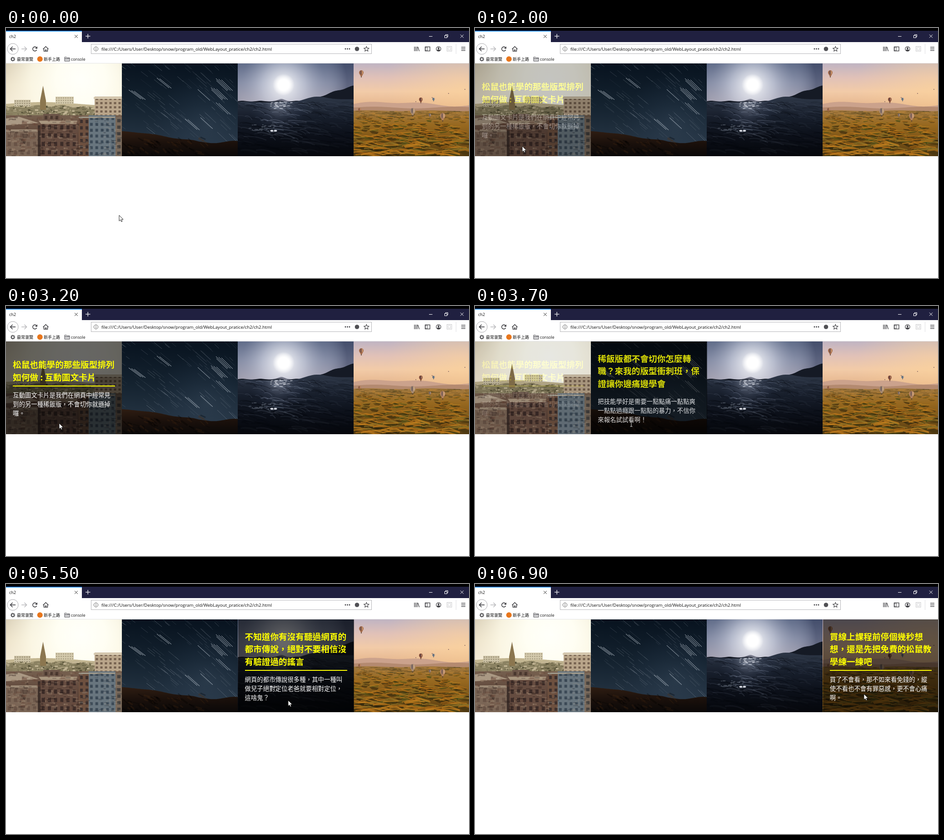
An HTML page with a canvas for the animation above (7300 ms loop, 1019 by 550 pixels).

```html
<!DOCTYPE html>
<html lang="zh-Hant">
<head>
<meta charset="utf-8">
<style>
html, body { margin: 0; width: 100%; height: 100%; overflow: hidden; background: #fff; }
canvas, svg { position: absolute; left: 0; top: 0; }
.card {
  position: absolute; top: 78px; width: 255.25px; height: 204px; box-sizing: border-box; padding: 0 15px;
  display: flex; flex-direction: column; justify-content: center; overflow: hidden;
  background: rgba(0, 0, 0, .6); color: #fff; white-space: nowrap;
  font: 13.43px/20.15px "Noto Sans CJK TC", "Noto Sans CJK", sans-serif;
}
h2 { position: relative; margin: 0 0 8px; padding-bottom: 7px; font-size: 18.65px; line-height: 27.8px; color: #ff0; }
h2 i { position: absolute; left: 0; bottom: 0; height: 2px; background: #ff0; }
p { margin: 0; }
</style>
</head>
<body>
<canvas id="stage" width="1019" height="550"></canvas>
<div id="cards"></div>
<svg width="1019" height="550">
  <g id="cursor">
    <path id="arrow" d="M0 0V12.6L2.9 9.9L4.8 14.2L6.9 13.3L5 9.1H9Z" fill="#fff" stroke="#111" stroke-width=".9"/>
    <path id="beam" d="M-2.5-6H2.5M0-6V6M-2.5 6H2.5" fill="none" stroke="#ddd"/>
  </g>
</svg>
<script>
const $ = id => document.getElementById(id);
const c = $('stage').getContext('2d');
const TOP = 78, BOTTOM = 282;
const left = i => Math.floor(i * 255.25);

// Drawing helpers
let seed = 7;
const rnd = (a = 0, b = 1) => a + (b - a) * ((seed = seed * 16807 % 2147483647) / 2147483647);
const pick = list => list[Math.floor(rnd(0, list.length))];
const rect = (color, x, y, w, h) => { c.fillStyle = color; c.fillRect(x, y, w, h); };
function trace(pts) {
  c.beginPath();
  for (let i = 0; i < pts.length; i += 2) c.lineTo(pts[i], pts[i + 1]);
}
const poly = (color, ...pts) => { trace(pts); c.fillStyle = color; c.fill(); };
const line = (color, width, ...pts) => { trace(pts); c.strokeStyle = color; c.lineWidth = width; c.stroke(); };
function disc(color, x, y, rx, ry = rx) {
  c.beginPath(); c.ellipse(x, y, rx, ry, 0, 0, 7); c.fillStyle = color; c.fill();
}
function ring(color, width, x, y, r, from = 0, to = 2 * Math.PI) {
  c.beginPath(); c.arc(x, y, r, from, to); c.strokeStyle = color; c.lineWidth = width; c.stroke();
}
const frame = (color, width, x, y, w, h) => { c.strokeStyle = color; c.lineWidth = width; c.strokeRect(x, y, w, h); };
function text(s, x, y, size) {
  c.font = `${size}px "Open Sans", "Noto Sans CJK TC", "Noto Sans CJK", sans-serif`;
  c.fillStyle = '#111'; c.fillText(s, x, y);
}
function fade(gradient, colors) {
  colors.forEach((color, i) => gradient.addColorStop(i / (colors.length - 1), color));
  return gradient;
}
const vertical = (y0, y1, ...colors) => fade(c.createLinearGradient(0, y0, 0, y1), colors);
const glow = (x, y, r, ...colors) => fade(c.createRadialGradient(x, y, 0, x, y, r), colors);
const fill = (i, color, y = TOP) => rect(color, left(i), y, 256, BOTTOM - y);
// Ground of photo i below the height f(u), u = 0..1 across the photo
function ridge(i, color, f) {
  c.beginPath(); c.moveTo(left(i), BOTTOM);
  for (let x = 0; x <= 256; x += 2) c.lineTo(left(i) + x, f(x / 256));
  c.lineTo(left(i) + 256, BOTTOM); c.fillStyle = color; c.fill();
}
// Block with evenly spaced windows
function building(wall, glass, x, y, w, h, cols, rows) {
  rect(wall, x, y, w, h);
  const dx = w / cols, dy = h / rows;
  for (let i = 0; i < cols; i++)
    for (let j = 0; j < rows; j++) rect(glass, x + (i + .25) * dx, y + (j + .3) * dy, dx * .5, dy * .5);
}
function speckle(n, x, y, w, h, colors, mw, mh) {
  for (let i = 0; i < n; i++) rect(pick(colors), rnd(x, x + w), rnd(y, y + h), rnd(1, mw), rnd(1, mh));
}

function drawBrowser() {
  const ink = '#3c3c40';
  rect('#000', 0, 0, 1019, 6);
  rect('#202040', 0, 6, 1019, 25);
  rect('#fff', 0, 6, 167, 25);
  rect('#0a84ff', 0, 6, 167, 1.6);
  text('ch2', 7, 22, 9);
  const cross = (color, x, y, r) => {
    line(color, 1, x - r, y - r, x + r, y + r);
    line(color, 1, x - r, y + r, x + r, y - r);
  };
  cross('#222', 154.5, 18.5, 3.3);
  line('#fff', 1.2, 175, 18, 185.5, 18);
  line('#fff', 1.2, 180.2, 13, 180.2, 23);
  line('#fff', 1, 931, 18.5, 938.5, 18.5);
  frame('#fff', 1, 965.5, 16.5, 5, 5);
  line('#fff', 1, 967.5, 16, 967.5, 14.5, 972.5, 14.5, 972.5, 19.5, 971, 19.5);
  cross('#fff', 1003.5, 18, 3.5);

  rect('#fff', 0, 31, 1019, 47);
  rect('#e4e4e6', 0, 77, 1019, 1);
  ring('#a9a9ad', 1, 15, 46, 12);
  line(ink, 1.6, 21, 46, 10, 46); line(ink, 1.6, 14.5, 41, 9.5, 46, 14.5, 51);
  line('#b8b8bb', 1.5, 34, 46, 45, 46); line('#b8b8bb', 1.5, 40.5, 41, 45.5, 46, 40.5, 51);
  ring(ink, 1.6, 63.5, 46, 4.6, .5, 5.5);
  poly(ink, 69, 40.5, 69, 45.5, 64, 45.5);
  line(ink, 1.5, 81.5, 46.5, 87.5, 40.8, 93.5, 46.5);
  line(ink, 1.5, 83.5, 45.5, 83.5, 51, 91.5, 51, 91.5, 45.5);
  rect(ink, 86.5, 47, 2.2, 4);

  frame('#b5b5b8', 1, 187.5, 35.5, 617, 21);
  ring('#555', .9, 198, 46, 4.6);
  rect('#555', 197.5, 45, 1.1, 3.6); rect('#555', 197.5, 43, 1.1, 1.2);
  text('file:///C:/Users/User/Desktop/snow/program_old/WebLayout_pratice/ch2/ch2.html', 210, 49.7, 9.8);
  for (let x = 747; x < 758; x += 4.5) disc(ink, x, 46, 1.4);
  disc('#505054', 772.5, 46, 4.8);
  c.beginPath();
  for (let i = 0; i < 10; i++) {
    const r = i % 2 ? 2.7 : 5.8, a = i * Math.PI / 5 - Math.PI / 2;
    c.lineTo(793.3 + r * Math.cos(a), 46.3 + r * Math.sin(a));
  }
  c.closePath(); c.strokeStyle = ink; c.lineWidth = 1.1; c.stroke();

  for (const x of [899, 902, 905]) line(ink, 1.3, x, 41, x, 51);
  line(ink, 1.3, 906.5, 41.5, 909.5, 51);
  frame(ink, 1.3, 922.5, 41.5, 10.5, 9); frame(ink, 1, 923, 42, 4, 8);
  ring(ink, 1.2, 952, 46, 5.1); disc(ink, 952, 44.5, 2); disc(ink, 952, 48.8, 3.2, 1.8);
  frame('#c8c8ca', 1, 970.5, 40.5, 10.5, 10.5); frame('#d2d2d4', 1, 973, 43, 5.5, 5.5);
  rect('#e0e0e2', 990, 35, 1, 22);
  for (let y = 42.3; y < 51; y += 3.6) line(ink, 1.3, 1002, y, 1011, y);

  ring(ink, 1.5, 15, 68.5, 3);
  for (let a = 0; a < 6; a += Math.PI / 4)
    line(ink, 1.3, 15 + 3.3 * Math.cos(a), 68.5 + 3.3 * Math.sin(a), 15 + 5.2 * Math.cos(a), 68.5 + 5.2 * Math.sin(a));
  text('最常瀏覽', 24, 71.8, 9);
  disc('#e8761c', 74.7, 68.2, 6);
  text('新手上路', 83, 71.8, 9);
  rect('#d4d4d6', 129, 65, 11, 8);
  line('#55555a', 1, 129, 73, 129, 64, 133, 64, 134.5, 65.5, 140, 65.5, 140, 73, 129, 73);
  line('#55555a', 1, 129, 67.5, 140, 67.5);
  text('console', 143, 71.8, 8.8);
}

function drawCity() {
  fill(0, vertical(78, 170, '#dcd2bb', '#ede3cb', '#f5ecd8'));
  fill(0, glow(165, 112, 165, '#fffffa', '#fffef3', 'rgba(255,252,235,.75)', 'rgba(255,250,230,0)'));
  ridge(0, '#c3b691', u => 167 - 4 * Math.sin(u * 5));
  ridge(0, '#8b8262', u => 176 - 5 * Math.sin(u * 4) - 2 * Math.sin(u * 29));
  building('#cdc3a7', '#9d9277', 18, 158, 36, 15, 7, 3);
  building('#d5cbae', '#a99f82', 109, 151, 40, 16, 8, 3);
  speckle(200, 0, 170, 200, 22, ['#6b6548', '#a59a78', '#575239', '#c1b494', '#857a5b'], 8, 4);
  poly('#8b764f', 81.5, 127, 88, 160, 88, 180, 75, 180, 75, 160);
  building('#b9a58a', '#75614f', 195, 151, 60, 46, 6, 5);
  rect('#d8cbb2', 193, 152, 62, 4);
  fill(0, vertical(192, 282, '#76604f', '#5e463a', '#4d372f'), 192);
  building('#7b6656', '#685346', 0, 226, 70, 56, 5, 3);
  building('#654c40', '#3c2c28', 75, 208, 82, 74, 6, 4);
  building('#6b5548', '#4a382f', 82, 189, 36, 15, 3, 1);
  poly('#aa9984', 0, 199, 28, 195, 72, 209, 0, 214);
  poly('#a8967f', 72, 204, 157, 204, 155, 211, 77, 211);
  rect('#9b8975', 0, 223, 70, 5);
  rect('#3e302a', 70, 214, 6, 68);
  building('#6d503f', '#3d302d', 160, 198, 24, 84, 2, 6);
  building('#68757e', '#3c4a57', 182, 192, 59, 90, 5, 7);
  building('#7a6a5b', '#46423f', 241, 196, 15, 86, 1, 6);
  rect('#a09a8c', 160, 195, 80, 3);
  speckle(260, 0, 192, 160, 90, ['rgba(40,28,24,.35)', 'rgba(175,152,125,.3)', 'rgba(105,70,55,.35)'], 12, 5);
  speckle(90, 160, 195, 95, 87, ['rgba(35,40,50,.3)', 'rgba(155,150,140,.3)'], 12, 3);
}

function drawStars() {
  fill(1, vertical(78, 260, '#08131f', '#14222f', '#273645'));
  fill(1, glow(440, 215, 115, 'rgba(58,76,95,.4)', 'rgba(40,60,85,0)'));
  const streak = (x, y, n, alpha, width) => line(`rgba(225,232,240,${alpha})`, width, x, y, x + n, y + n * (.72 + (x - 255) / 900));
  for (let i = 0; i < 130; i++) streak(rnd(235, 505), rnd(65, 240), rnd(7, 26), rnd(.08, .35), rnd(.5, .9));
  for (const [x, y, n] of [[332, 110, 2], [462, 111, 4], [451, 131, 4], [270, 136, 3], [462, 164, 2], [394, 200, 2], [422, 135, 1], [428, 197, 1]])
    for (let i = 0; i < n; i++) streak(x + i * 6 % 17, y + i * 1.5, 27 - i, .75, 1);
  ridge(1, vertical(226, 282, '#2f1d12', '#1a100b', '#0a0808'), u => 227 + 24 * Math.min(1, u * 1.5) ** 1.3 + 3 * Math.sin(u * 18) * u);
  for (let i = 0; i < 70; i++) {
    const x = rnd(255, 440), y = rnd(240, 276);
    line(pick(['rgba(85,48,20,.2)', 'rgba(0,0,0,.3)']), rnd(1, 4), x, y, x + rnd(5, 15), y + rnd(3, 11));
  }
}

function drawSea() {
  fill(2, vertical(78, 162, '#556280', '#858ca4', '#aaa5b2'));
  fill(2, glow(611, 125, 140, '#fff', 'rgba(215,219,232,.6)', 'rgba(150,158,182,.2)', 'rgba(50,58,88,.5)'));
  disc(glow(611, 125, 24, '#fff', '#fff', 'rgba(255,255,255,0)'), 611, 125, 24);
  ridge(2, '#77798a', u => 161 - 5 * Math.exp(-(((u - .375) / .04) ** 2)));
  ridge(2, '#151a25', u => 161 - 34 * Math.max(0, (u - .64) / .36) ** .75 - Math.sin(u * 40));
  const swell = u => 163 - 11 * Math.exp(-(((u - .7) / .16) ** 2)) - 6 * u ** 6 - Math.sin(u * 22);
  ridge(2, vertical(152, 282, '#2d3646', '#171e2b', '#0b0f18', '#05070c'), swell);
  c.save(); c.clip();
  fill(2, glow(600, 168, 65, 'rgba(175,182,200,.55)', 'rgba(100,110,135,.2)', 'rgba(60,75,110,0)'));
  for (let i = 0; i < 230; i++) {
    const d = rnd() ** 1.4, x = rnd(490, 760), y = 163 + d * 108, n = rnd(10, 35 + d * 30);
    const near = Math.exp(-(((x + n / 2 - 600) / 65) ** 2));
    c.beginPath(); c.moveTo(x, y);
    c.quadraticCurveTo(x + n * .5, y - rnd(1, 4), x + n, y + rnd(2, 9));
    c.strokeStyle = rnd() < .5 ? `rgba(150,162,185,${(.08 + near * .35) * (1 - d * .85)})` : 'rgba(4,7,14,.35)';
    c.lineWidth = rnd(.7, 1.2 + d * 3); c.stroke();
  }
  for (let i = 0; i < 26; i++) disc('rgba(245,248,255,.7)', 605 + rnd(-24, 24), rnd(162, 178), rnd(1, 5), .7);
  for (let i = 0; i < 22; i++) disc('rgba(190,198,215,.3)', rnd(535, 610), rnd(213, 228), rnd(1, 5), 1);
  for (const x of [585, 593]) disc('rgba(245,248,255,.85)', x, 226, 3.5, 2);
  c.restore();
}

function drawBalloons() {
  fill(3, vertical(78, 170, '#c0b4c2', '#e0c1b8', '#f2cba8', '#e6b78f'));
  fill(3, glow(1000, 125, 160, 'rgba(255,213,150,.5)', 'rgba(255,210,150,0)'));
  ridge(3, '#cba28c', u => 167 - 4 * Math.sin(u * 5) - 2 * Math.sin(u * 13));
  ridge(3, '#b48a70', u => 175 - 2 * Math.sin(u * 9));
  ridge(3, vertical(180, 282, '#a27a42', '#97681f', '#7a5317', '#573d12'), u => 182 - Math.sin(u * 12));
  speckle(220, 765, 182, 254, 18, ['rgba(85,72,34,.6)', 'rgba(190,132,52,.5)', 'rgba(120,88,38,.6)'], 20, 2);
  // Gullies: a shaded slope under each sunlit crest, growing towards the viewer
  for (let i = 0; i < 260; i++) {
    const d = i / 260, x = rnd(750, 1015), y = 194 + d * 86, s = 5 + d * 16, h = s * rnd(.25, .55), tilt = rnd(-.25, .4) * s;
    poly(pick(['rgba(48,36,12,.6)', 'rgba(72,54,16,.6)', 'rgba(70,72,22,.55)']), x - s, y, x + s, y + tilt, x + s * .6, y + h + tilt, x - s * .4, y + h);
    line(pick(['rgba(196,128,32,.7)', 'rgba(176,108,24,.7)', 'rgba(150,120,40,.6)']), 1 + d * 2, x - s, y, x - s * .2, y - h * .3, x + s, y + tilt);
  }
  const balloon = (color, x, y, r) => {
    disc(color, x, y, r);
    poly(color, x - r * .9, y + r * .4, x + r * .9, y + r * .4, x + r * .2, y + r * 1.7, x - r * .2, y + r * 1.7);
    disc('rgba(70,65,85,.5)', x - r * .2, y, r * .3, r * .9);
    disc('rgba(245,205,155,.45)', x + r * .5, y, r * .25, r * .8);
    rect('#57402c', x - r * .2, y + r * 1.7, r * .4, r * .4);
  };
  balloon('#a26847', 782, 98, 5);
  balloon('#854c38', 913, 157, 4);
  balloon('#a78970', 895, 182, 6);
  balloon('#65798a', 941, 156, 2.6);
  balloon('#b1815f', 961, 193, 6);
  balloon('#8a7468', 933, 191, 2.7);
  balloon('#a26847', 778, 179, 3);
  for (let x = 902; x < 1019; x += 36) disc('#8d6f68', x, 162 - (x - 902) * .25, 1.1);
}

drawBrowser();
[drawCity, drawStars, drawSea, drawBalloons].forEach((draw, i) => {
  c.save();
  c.beginPath(); c.rect(left(i), TOP, left(i + 1) - left(i), BOTTOM - TOP); c.clip();
  draw();
  c.restore();
});

// Hover cards: time the pointer enters, heading, body
const cards = [
  [1880, '松鼠也能學的那些版型排列|如何做 : 互動圖文卡片', '互動圖文卡片是我們在網頁中經常見|到的另一種稀飯版，不會切你就遜掉|囉。'],
  [3425, '稀飯版都不會切你怎麼轉|職？來我的版型衝刺班，保|證讓你邊痛邊學會', '把技能學好是需要一點點痛一點點爽|一點點過癮跟一點點的暴力，不信你|來報名試試看啊！'],
  [4700, '不知道你有沒有聽過網頁的|都市傳說，絕對不要相信沒|有驗證過的謠言', '網頁的都市傳說很多種，其中一種叫|做兒子絕對定位老爸就要相對定位，|這啥鬼？'],
  [6150, '買線上課程前停個幾秒想|想，還是先把免費的松鼠教|學練一練吧', '買了不會看，那不如來看免錢的，縱|使不看也不會有罪惡感，更不會心痛|啊。'],
];
const lines = s => s.replaceAll('|', '<br>');
$('cards').innerHTML = cards.map(([, head, body], i) =>
  `<div class="card" style="left:${i * 255.25}px"><h2>${lines(head)}<i></i></h2><p>${lines(body)}</p></div>`).join('');
const boxes = [...document.querySelectorAll('.card')];

// CSS "ease" curve, solved by bisection
function ease(x) {
  if (x <= 0) return 0;
  if (x >= 1) return 1;
  let lo = 0, hi = 1, s;
  for (let i = 0; i < 20; i++) {
    s = (lo + hi) / 2;
    const bx = .75 * s * (1 - s) + s ** 3;
    if (bx < x) lo = s; else hi = s;
  }
  return .3 * s * (1 - s) ** 2 + 3 * s * s * (1 - s) + s ** 3;
}
function shown(i, t, delay) {
  const leave = i < 3 ? cards[i + 1][0] : Infinity;
  return ease((t - cards[i][0] - delay) / 500) - ease((t - leave - delay) / 500);
}

// Pointer moves: start, end, target
const moves = [
  [1200, 2000, 104, 260], [2000, 2700, 117, 258], [3200, 3700, 344, 259], [3700, 4100, 390, 262],
  [4500, 4800, 575, 258], [4800, 5200, 621, 256], [5700, 6500, 856, 242],
];
function pointer(t) {
  let x = 249, y = 412;
  for (const [from, to, tx, ty] of moves) {
    const p = Math.min(1, Math.max(0, (t - from) / (to - from)));
    x += (tx - x) * p;
    y += (ty - y) * p;
  }
  return [x, y];
}

const start = performance.now();
function tick() {
  const t = Math.floor((performance.now() - start) % 7300 / 100) * 100;
  boxes.forEach((box, i) => {
    box.style.opacity = shown(i, t, 0);
    box.querySelector('i').style.width = shown(i, t, 300) * 100 + '%';
  });
  const overText = t >= 3500 && t < 3900 || t >= 4700 && t < 4900;
  $('arrow').style.display = overText ? 'none' : '';
  $('beam').style.display = overText ? '' : 'none';
  $('cursor').setAttribute('transform', `translate(${pointer(t)})`);
  requestAnimationFrame(tick);
}
tick();
</script>
</body>
</html>
```
